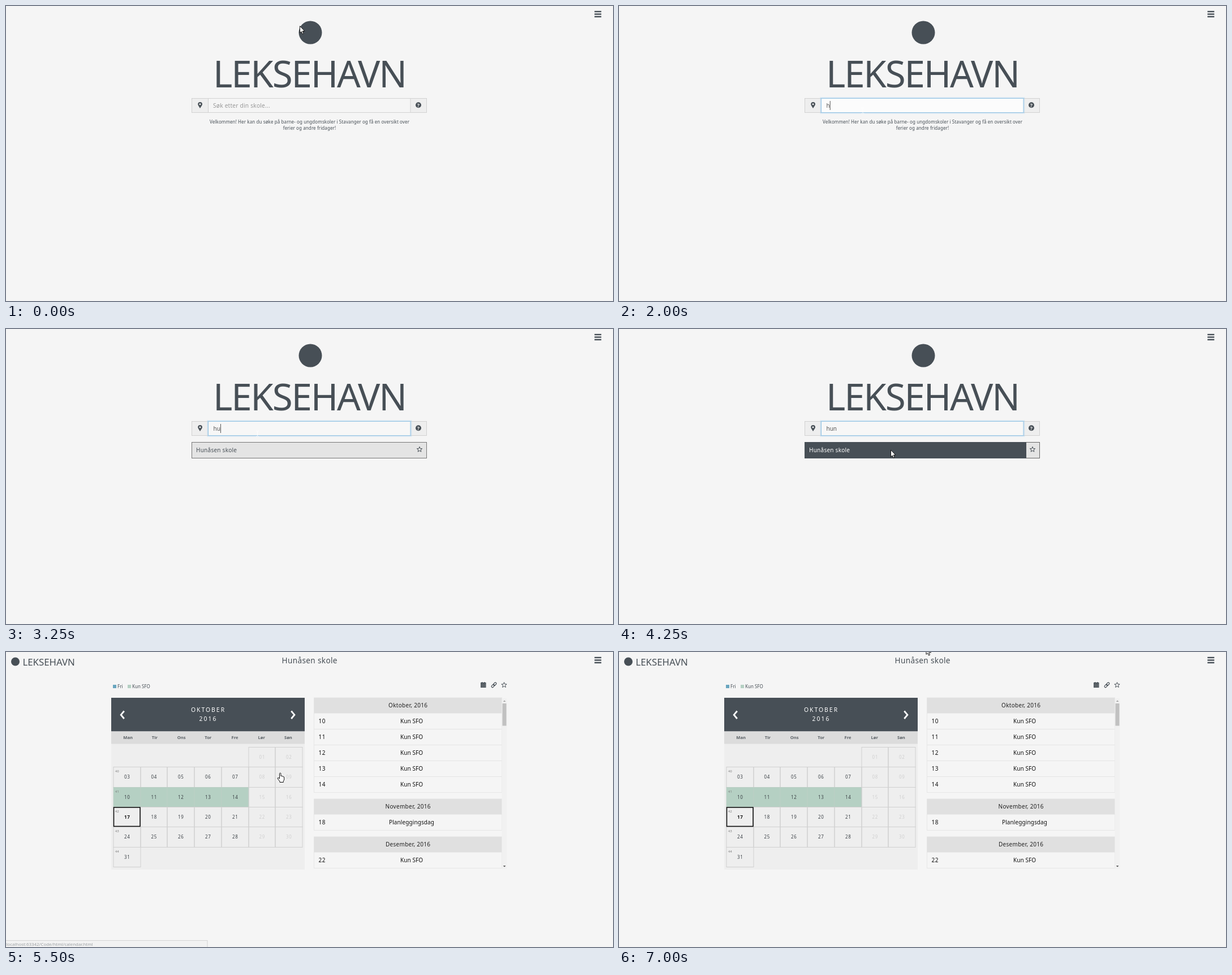
Animation of 1073 by 522 pixels, one loop 7250 ms. Source, as an HTML page:

```html
<!DOCTYPE html>
<html lang="no">
<head>
<meta charset="utf-8">
<title>Leksehavn</title>
<style>
  html, body { margin: 0; width: 100%; height: 100%; overflow: hidden; background: #f5f5f5; }
  svg { display: block; width: 100%; height: 100%; }
  text { font-family: "Noto Sans", "Open Sans", sans-serif; white-space: pre; }
</style>
</head>
<body>
<svg id="stage" viewBox="0 0 1073 522"></svg>
<script>
const NS = 'http://www.w3.org/2000/svg';
const INK = '#474f56', PAPER = '#f5f5f5', GREEN = '#b5d0c3';
const APP = 'LEKSEHAVN', SCHOOL = 'Hunåsen skole';
const LOOP = 7250;

function el(parent, tag, attrs = {}, text) {
  const e = document.createElementNS(NS, tag);
  for (const k in attrs) e.setAttribute(k, attrs[k]);
  if (text !== undefined) e.textContent = text;
  parent.appendChild(e);
  return e;
}
const group = parent => el(parent, 'g');
const rect = (p, x, y, w, h, fill, stroke) =>
  el(p, 'rect', { x, y, width: w, height: h, fill, stroke: stroke || 'none' });
const path = (p, d, attrs) => el(p, 'path', { d, ...attrs });
const line = (p, d, stroke, width = 1) => path(p, d, { fill: 'none', stroke, 'stroke-width': width });
const dot = (p, cx, cy, r, fill) => el(p, 'circle', { cx, cy, r, fill });

function label(p, x, y, str, size, { fill = INK, gap = 0, weight = 400, mid = false } = {}) {
  return el(p, 'text', {
    x: mid ? x + gap / 2 : x, y, fill, 'font-size': size, 'font-weight': weight,
    'letter-spacing': gap, 'text-anchor': mid ? 'middle' : 'start'
  }, str);
}

function star(p, x, y) {
  let d = '';
  for (let i = 0; i < 10; i++) {
    const r = i % 2 ? 2.1 : 4.9, a = (i / 5 - 0.5) * Math.PI;
    d += (i ? 'L' : 'M') + (x + r * Math.cos(a)).toFixed(2) + ' ' + (y + r * Math.sin(a)).toFixed(2);
  }
  path(p, d + 'Z', { fill: 'none', stroke: INK, 'stroke-width': 1 });
}

function scrollbar(p, x, top, bottom, thumbTop, thumbBottom) {
  rect(p, x, top, 9, bottom - top, '#f1f1f1');
  rect(p, x + 1, thumbTop, 7, thumbBottom - thumbTop, '#c1c1c1');
  path(p, `M${x + 2.3} ${top + 6}h4.6l-2.3-2.4Z`, { fill: '#a3a3a3' });
  path(p, `M${x + 2.3} ${bottom - 6}h4.6l-2.3 2.4Z`, { fill: '#505050' });
}

const stage = document.getElementById('stage');
rect(stage, 0, 0, 1073, 522, PAPER);

// Start page
const home = group(stage);
dot(home, 538, 47, 20.5, INK);
label(home, 537.5, 144, APP, 65.5, { weight: 500, gap: -2.2, mid: true });
rect(home, 328.5, 163.5, 415, 25, '#eee', '#d2d2d2');
path(home, 'M343 181C341 177.5 339.2 176 339.2 173.8A3.9 3.9 0 0 1 347 173.8C347 176 345 177.5 343 181ZM343 172.2a1.6 1.6 0 1 0 .01 0Z',
  { fill: INK, 'fill-rule': 'evenodd' });
dot(home, 729, 175.2, 5, INK);
label(home, 729, 178.5, '?', 9, { fill: '#eee', weight: 700, mid: true });

const glow = group(home);
for (const [w, o] of [[5, 0.1], [3, 0.16]])
  el(glow, 'rect', { x: 357.5, y: 163.5, width: 357.5, height: 25, fill: 'none', stroke: '#66afe9', 'stroke-width': w, opacity: o });
const field = rect(home, 357.5, 163.5, 357.5, 25, PAPER, '#d2d2d2');
const hint = label(home, 366, 179.5, 'Søk etter din skole...', 10.2, { fill: '#999', gap: 0.2 });
const typed = label(home, 366.5, 179.5, '', 10, { fill: '#555' });
const caret = rect(home, 0, 168, 1, 16, '#555');

const intro = group(home);
label(intro, 536.5, 208, 'Velkommen! Her kan du søke på barne- og ungdomskoler i Stavanger og få en oversikt over', 8, { gap: 0.1, mid: true });
label(intro, 536.5, 219.3, 'ferier og andre fridager!', 8, { gap: 0.1, mid: true });

const list = group(home);
rect(list, 328, 200, 407, 224, '#e4e4e4');
line(list, 'M328.5 424V200.5H734.5V424', '#6b7073');
['Ormelia', 'Lyngsol', 'Tunebru', 'Granselund', 'Hunåsen', 'Bjelta', 'Vardelund', 'Tjernelia'].forEach((name, i) => {
  const y = 213.5 + i * 27.4;
  label(list, 336, y + 4, name + ' skole', 10, { gap: 0.25 });
  star(list, 721.5, y - 0.3);
});
scrollbar(list, 735, 201, 424, 209.5, 255);

const hit = group(home);
rect(hit, 328.5, 200.5, 415, 28, '#e4e4e4', '#777');
const hover = rect(hit, 328, 200, 392, 29, INK);
const edge = line(hit, 'M720 200.5H743.5V228.5H720', '#666');
const hitName = label(hit, 336, 217.6, SCHOOL, 10, { gap: 0.25, weight: 500 });
star(hit, 731, 213.2);

// Calendar page
const cal = group(stage);
dot(cal, 16.5, 17, 7.5, INK);
label(cal, 29.5, 24, APP, 16.8);
label(cal, 536.5, 19.5, SCHOOL, 13.6, { gap: 0.35, mid: true });
rect(cal, 189, 58, 6, 6, '#69a6bf');
label(cal, 197, 64, 'Fri', 8);
rect(cal, 215, 58, 6, 6, GREEN);
label(cal, 223, 64, 'Kun SFO', 8);

rect(cal, 839, 54, 9.5, 9, INK);
rect(cal, 841, 53, 1.2, 2, INK);
rect(cal, 845.3, 53, 1.2, 2, INK);
line(cal, 'M839.5 56.5h8.5M839.5 59h8.5M839.5 61h8.5', '#a4a8ab', 0.5);
for (const [x, y] of [[860.8, 60], [864.2, 56.6]])
  el(cal, 'rect', { x: x - 3, y: y - 1.8, width: 6, height: 3.6, rx: 1.8, fill: 'none', stroke: INK, 'stroke-width': 1.2, transform: `rotate(-45 ${x} ${y})` });
star(cal, 880.5, 58.5);

rect(cal, 186, 81, 342, 304, '#eee');
rect(cal, 186, 81, 342, 59.5, INK);
rect(cal, 186, 140.5, 342, 22, '#dcdcdc');
label(cal, 356.5, 106, 'OKTOBER', 10.4, { fill: '#fff', gap: 2, weight: 500, mid: true });
label(cal, 356.5, 122, '2016', 10.4, { fill: '#fff', gap: 2, weight: 500, mid: true });
line(cal, 'M208.8 104.5L203.2 111.2L208.8 118M504.3 104.5L509.9 111.2L504.3 118', '#fff', 2.8);
'Man Tir Ons Tor Fre Lør Søn'.split(' ').forEach((d, i) =>
  label(cal, 215.7 + i * 47.2, 153.8, d, 7.6, { fill: '#5b6166', weight: 700, mid: true }));

const cellX = c => Math.round(190 + c * 47.72) + 0.5;
const cellY = r => Math.round(168 + r * 35.3) + 0.5;
for (let day = 1; day <= 31; day++) {
  const c = (day + 4) % 7, r = Math.floor((day + 4) / 7);
  const x = cellX(c) - 0.5, y = cellY(r), w = cellX(c + 1) - cellX(c), h = cellY(r + 1) - y;
  const free = r === 2 && c < 5;
  rect(cal, x, y, w, h, free ? GREEN : 'none', free ? '#bccfc5' : '#d0d0d0');
  label(cal, x + w / 2, y + h / 2 + 2.8, String(day).padStart(2, '0'), 8,
    { fill: c > 4 ? '#d0d0d0' : day === 17 ? '#111' : '#3c4247', gap: 0.6, weight: day === 17 ? 700 : 400, mid: true });
  if (c === 0) label(cal, x + 3, y + 9.3, String(39 + r), 5.5, { fill: '#777', gap: 0.4 });
}
el(cal, 'rect', { x: 190.5, y: 275, width: 46.5, height: 33.5, fill: 'none', stroke: '#111', 'stroke-width': 1.6 });

function month(top, name, days, what) {
  const bottom = top + 27.5 + days.length * 28;
  rect(cal, 544.5, top, 332, bottom - top, PAPER, '#e6e6e6');
  rect(cal, 544.5, top, 332, 27.5, '#e0e0e0');
  label(cal, 710.5, top + 17, name + ', 2016', 10, { fill: '#222', gap: 0.3, mid: true });
  days.forEach((d, i) => {
    const y = top + 27.5 + i * 28;
    if (i) line(cal, `M545 ${y}H876.5`, '#e4e4e4');
    label(cal, 552.5, y + 17.4, d, 10, { fill: '#111', gap: 0.5 });
    label(cal, 717, y + 17.4, what, 10, { fill: '#111', gap: 0.1, mid: true });
  });
}
month(81, 'Oktober', [10, 11, 12, 13, 14], 'Kun SFO');
month(260, 'November', [18], 'Planleggingsdag');
month(327, 'Desember', [22], 'Kun SFO');
scrollbar(cal, 876.5, 82, 384, 91, 130.5);

// Shared parts
for (let i = 0; i < 3; i++) rect(stage, 1040.3, 8.7 + i * 4.5, 12, 2.4, INK);

const status = group(stage);
rect(status, -0.5, 510.5, 356.5, 13, '#f2f2f2', '#d4d4d4');
const url = label(status, 0.5, 520, 'localhost:63342/Code/html/calendar.html', 7.9);

const outline = { fill: '#fff', stroke: '#111', 'stroke-width': 1, 'stroke-linejoin': 'round' };
const pointers = {
  arrow: path(stage, 'M.5 .5V12.8L3.2 10.3L5 14.6L7 13.7L5.2 9.5H9Z', outline),
  hand: path(stage, 'M4.5 11V1.8Q5.7 0 6.9 1.8V6.5Q8.3 5.5 9 7Q10.3 6.2 11 7.6Q12.5 7.3 12.7 9V13L11.3 15.5V17.5H5V16L1 10.8Q1.2 8.8 3 9.8Z', outline),
  beam: path(stage, 'M0 .5H2M3 .5H5M2.5 1V9.5M0 10H2M3 10H5', { fill: 'none', stroke: '#fff', 'stroke-width': 0.8 })
};

// Each step changes only the values it lists
const steps = [
  [0, { page: 'home', panel: 'intro', value: '', caret: 0, focus: 0, bg: '#f5f5f5', border: '#d2d2d2', over: 0, status: 0, cur: ['arrow', 519, 35] }],
  [250, { cur: ['beam', 451, 133] }],
  [500, { cur: null }],
  [1000, { focus: 1, caret: 1, bg: '#fcfcfc', border: '#94c3e2', cur: ['beam', 428.5, 180] }],
  [1500, { caret: 0 }],
  [2000, { value: 'h', caret: 1 }],
  [2250, { panel: 'list' }],
  [2500, { cur: ['beam', 442, 180] }],
  [2750, { caret: 0 }],
  [3250, { value: 'hu', caret: 1, panel: 'hit', bg: '#f7f7f7' }],
  [3750, { value: 'hun' }],
  [4000, { cur: ['arrow', 480, 197] }],
  [4250, { over: 1, caret: 0, cur: ['arrow', 480, 213.5] }],
  [4500, { status: 1, cur: ['hand', 479, 213] }],
  [4750, { caret: 1 }],
  [5000, { caret: 0, focus: 0.45, bg: '#fcfdfe', border: '#a3c8de', cur: ['arrow', 480, 213.5] }],
  [5250, { focus: 0, border: '#b2cedd' }],
  [5500, { page: 'cal', status: 0.6, cur: ['hand', 479, 213] }],
  [5750, { status: 0, cur: ['arrow', 482, 214] }],
  [6000, { cur: ['arrow', 503, 216] }],
  [6250, { cur: ['arrow', 522, 156] }],
  [6500, { cur: ['arrow', 549, 27] }],
  [6750, { cur: ['arrow', 543, -6] }],
  [7000, { cur: ['arrow', 542.5, -8.5] }]
];
const caretX = [366.5, 372.7, 379, 385];

const show = (e, on) => e.setAttribute('display', on ? 'inline' : 'none');

function draw(t) {
  const s = {};
  for (const [at, change] of steps) if (at <= t) Object.assign(s, change);

  show(home, s.page === 'home');
  show(cal, s.page === 'cal');
  show(intro, s.panel === 'intro');
  show(list, s.panel === 'list');
  show(hit, s.panel === 'hit');
  show(hint, !s.value);
  show(caret, s.caret);
  show(hover, s.over);
  show(edge, s.over);
  show(status, s.status);
  typed.textContent = s.value;
  caret.setAttribute('x', caretX[s.value.length]);
  glow.setAttribute('opacity', s.focus);
  field.setAttribute('fill', s.bg);
  field.setAttribute('stroke', s.border);
  hitName.setAttribute('fill', s.over ? '#fff' : INK);
  url.setAttribute('opacity', s.status < 1 ? 0.5 : 0.9);

  for (const k in pointers) show(pointers[k], s.cur && s.cur[0] === k);
  if (s.cur) pointers[s.cur[0]].setAttribute('transform', `translate(${s.cur[1]} ${s.cur[2]})`);
}

const start = performance.now();
function tick() {
  draw((performance.now() - start) % LOOP);
  requestAnimationFrame(tick);
}
tick();
</script>
</body>
</html>
```
